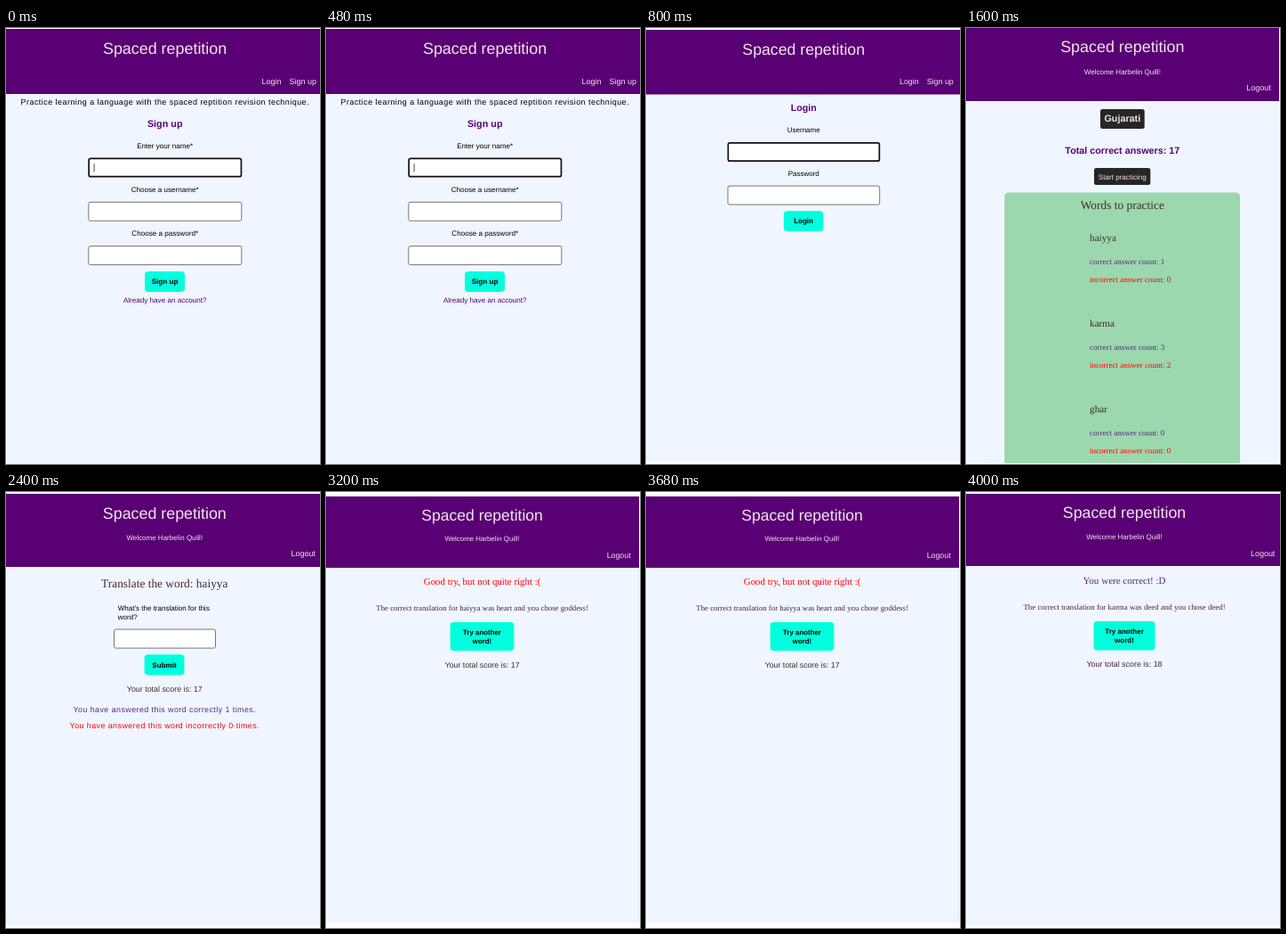
Recreate the animation shown at these times as an HTML page. Size 353 by 489 pixels, loop 4.8 s.

```html
<!DOCTYPE html>
<html lang="en">
<head>
<meta charset="utf-8">
<title>Spaced repetition</title>
<style>
  html, body { margin: 0; width: 100%; height: 100%; overflow: hidden; background: #fff; }
  svg { display: block; width: 353px; height: 489px; }
  text { font-family: "Liberation Sans", Arial, sans-serif; text-rendering: geometricPrecision; white-space: pre; }
  .serif { font-family: "Liberation Serif", "Times New Roman", serif; }
  .bold { font-weight: 700; }
  .wide { letter-spacing: .05em; }
  .mid { text-anchor: middle; }
</style>
</head>
<body>
<svg id="stage" viewBox="0 0 353 489" xmlns="http://www.w3.org/2000/svg"></svg>
<script>
const STEP = 800;
const PURPLE = '#580074', PALE = '#f4e4ea', PAGE = '#eff6ff', BROWN = '#47292c';
const VIOLET = '#5b2484', RED = '#ff0000', AQUA = '#00ffdc', DARK = '#262626', BLACK = '#000';
const USER = 'Harbelin Quill';
const stage = document.getElementById('stage');
let view;

function add(tag, attrs, content = '') {
  const el = document.createElementNS(stage.namespaceURI, tag);
  for (const key in attrs) el.setAttribute(key, attrs[key]);
  el.textContent = content;
  view.append(el);
}

const box = (x, y, right, bottom, fill, rx = 0) =>
  add('rect', { x, y, width: right - x, height: bottom - y, fill, rx });

const left = (str, x, y, size, fill = BLACK, cls = '') =>
  add('text', { x, y, 'font-size': size, fill, class: cls }, str);

const mid = (str, x, y, size, fill, cls = '') => left(str, x, y, size, fill, 'mid ' + cls);

function field(x, y, right, bottom, focus) {
  const line = focus ? 1.7 : 1;
  add('rect', {
    x: x + line / 2, y: y + line / 2, width: right - x - line, height: bottom - y - line,
    rx: 2, fill: '#fff', stroke: focus ? '#101010' : '#767676', 'stroke-width': line
  });
}

function button(x, y, right, bottom, size, base, ...lines) {
  box(x, y, right, bottom, AQUA, 4);
  lines.forEach((str, i) => mid(str, (x + right) / 2, base + i * 9.6, size, BLACK, 'bold'));
}

// Page background, banner and title
function page(top, bannerEnd, right, bottom, cx, base, size) {
  box(0, top, right, bottom, PAGE);
  box(0, top, right, bannerEnd, PURPLE);
  mid('Spaced repetition', cx, base, size, PALE);
}

function guestLinks(login, signUp, y, size) {
  left('Login', login, y, size, PALE);
  left('Sign up', signUp, y, size, PALE);
}

function userLinks(cx, y, size, logout, logoutY, logoutSize) {
  mid(`Welcome ${USER}!`, cx, y, size, PALE);
  left('Logout', logout, logoutY, logoutSize, PALE);
}

function signUpView() {
  page(1, 74, 353, 489, 178.6, 29.3, 17.9);
  guestLinks(287.5, 318.5, 63, 9);
  mid('Practice learning a language with the spaced reptition revision technique.', 178.8, 86, 9, BLACK, 'wide');
  mid('Sign up', 178.7, 111, 10.8, PURPLE, 'bold');
  ['Enter your name*', 'Choose a username*', 'Choose a password*'].forEach((label, i) => {
    mid(label, 178.7, 134.6 + i * 49.3, 8.1);
    const y = 145.5 + i * 49.3;
    field(92.3, y, 265.3, y + 22, i === 0);
  });
  box(98.7, 152, 99.4, 161.5, BLACK);
  button(156, 273, 201, 296, 8.1, 287.2, 'Sign up');
  mid('Already have an account?', 178.7, 308, 8.1, PURPLE);
}

function loginView() {
  page(2, 74.5, 353, 486, 177.2, 30, 17.7);
  guestLinks(285, 315.7, 63.4, 8.9);
  mid('Login', 177.2, 93.3, 10.7, PURPLE, 'bold');
  mid('Username', 177.2, 117.2, 8);
  field(91.5, 128, 263.2, 150, true);
  mid('Password', 177.2, 166, 8);
  field(91.5, 176.6, 263.2, 198.6);
  button(154.8, 205.3, 199.3, 228, 8, 219.4, 'Login');
}

function wordsView() {
  const cx = 175.8;
  page(0, 82, 352, 488, cx, 27.2, 17.9);
  userLinks(cx, 51.5, 8.05, 315.3, 70.4, 9);
  box(151, 91, 200.7, 113, DARK, 2.5);
  mid('Gujarati', cx, 105.4, 10.8, PALE, 'bold');
  mid('Total correct answers: 17', cx, 141, 10.75, PURPLE, 'bold');
  box(144, 157, 207.3, 176, DARK, 2.5);
  mid('Start practicing', cx, 169.5, 8.1, PALE);
  add('path', { d: 'M43.3 488V189.5q0 -5 5 -5H303q5 0 5 5V488z', fill: '#9bd8ad' });
  mid('Words to practice', cx, 203.2, 13.4, BROWN, 'serif');
  [['haiyya', 1, 0], ['karma', 3, 2], ['ghar', 0, 0]].forEach(([word, right, wrong], i) => {
    const y = 239 + i * 96.1;
    left(word, 139, y, 11.25, BROWN, 'serif');
    left('correct answer count: ' + right, 139, y + 26.2, 9, VIOLET, 'serif');
    left('incorrect answer count: ' + wrong, 139, y + 45.5, 9, RED, 'serif');
  });
}

function quizView() {
  const cx = 178.3;
  page(2, 84, 353, 486, cx, 29.7, 17.85);
  userLinks(cx, 53.5, 8, 320.5, 72.4, 8.95);
  mid('Translate the word: haiyya', cx, 107, 13.37, BROWN, 'serif');
  left("What's the translation for this", 125.8, 133.3, 8.03);
  left('word?', 125.8, 142.8, 8.03);
  field(121, 153.5, 236, 175.6);
  button(155.6, 182.2, 200.4, 205.3, 8.05, 196.5, 'Submit');
  mid('Your total score is: 17', cx, 223.8, 8.9, BROWN);
  mid('You have answered this word correctly 1 times.', cx, 246.8, 8.9, VIOLET, 'wide');
  mid('You have answered this word incorrectly 0 times.', cx, 264.6, 8.9, RED, 'wide');
}

function wrongView() {
  const cx = 175.6;
  page(5, 85, 352, 483, cx, 31.8, 17.55);
  box(351.3, 85, 352, 483, '#d5dae3');
  userLinks(cx, 55.2, 7.88, 315.7, 73.8, 8.8);
  mid('Good try, but not quite right :(', cx, 104, 10.92, RED, 'serif');
  mid('The correct translation for haiyya was heart and you chose goddess!', cx, 133, 8.78, BROWN, 'serif');
  button(139.6, 146, 211.4, 178, 7.88, 160, 'Try another', 'word!');
  mid('Your total score is: 17', cx, 197, 8.75, BROWN);
}

function rightView() {
  const cx = 178;
  page(2, 83, 353, 486, cx, 29.4, 17.8);
  userLinks(cx, 53, 8, 320, 72, 8.95);
  mid('You were correct! :D', cx, 102.5, 11.05, VIOLET, 'serif');
  mid('The correct translation for karma was deed and you chose deed!', cx, 131.8, 8.9, BROWN, 'serif');
  button(143.5, 145, 212.5, 177.5, 8, 159.3, 'Try another', 'word!');
  mid('Your total score is: 18', cx, 196.4, 8.88, BROWN);
}

const views = [signUpView, loginView, wordsView, quizView, wrongView, rightView].map(draw => {
  view = document.createElementNS(stage.namespaceURI, 'g');
  stage.append(view);
  draw();
  return view;
});

const start = performance.now();
function tick() {
  const elapsed = Math.max(0, performance.now() - start);
  const current = Math.floor(elapsed / STEP) % views.length;
  views.forEach((g, i) => g.setAttribute('display', i === current ? 'inline' : 'none'));
  requestAnimationFrame(tick);
}
tick();
</script>
</body>
</html>
```
